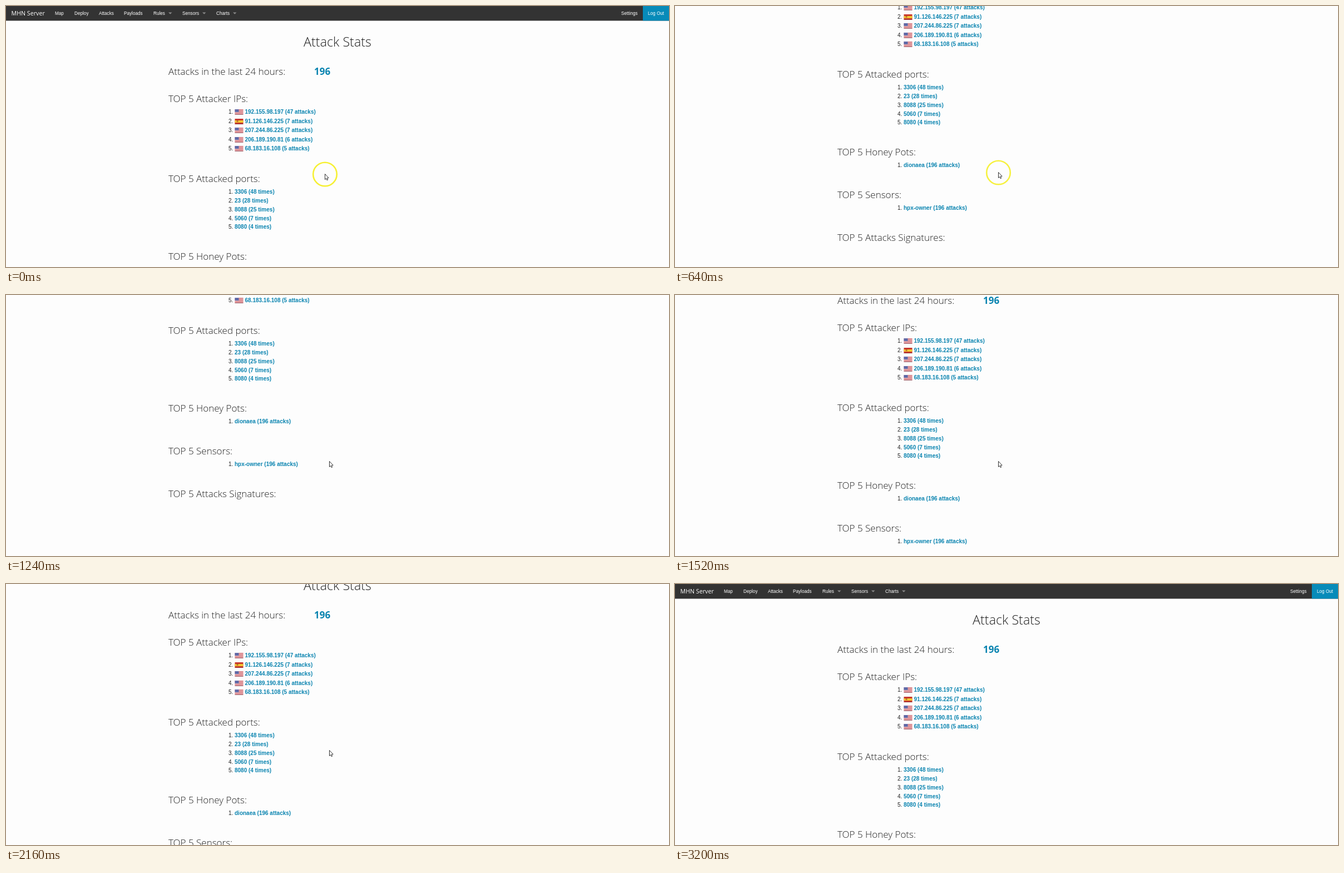
Recreate the animation shown at these times as an HTML page with a canvas. Size 1192x470 px, loop 4960 ms.

```html
<!DOCTYPE html>
<html lang="en">
<head>
<meta charset="utf-8">
<title>Attack Stats</title>
<style>
  html, body { margin: 0; height: 100%; overflow: hidden; background: #fdfdfd; }
  canvas { display: block; }
</style>
</head>
<body>
<canvas id="stage" width="1192" height="470"></canvas>
<script>
const ctx = document.getElementById('stage').getContext('2d');
const LOOP = 4960, INK = '#222', BLUE = '#0a84b0';
const LIGHT = '300 17px "Open Sans", sans-serif';
const LINK = 'bold 10px "Liberation Sans", Arial, sans-serif';
const PLAIN = '10px "Liberation Sans", Arial, sans-serif';
const NAV = '8.2px "Liberation Sans", Arial, sans-serif';

const attackers = [
  ['us', '192.155.98.197 (47 attacks)'],
  ['es', '91.126.146.225 (7 attacks)'],
  ['us', '207.244.86.225 (7 attacks)'],
  ['us', '206.189.190.81 (6 attacks)'],
  ['us', '68.183.16.108 (5 attacks)'],
];
const ports = ['3306 (48 times)', '23 (28 times)', '8088 (25 times)', '5060 (7 times)', '8080 (4 times)'];
const menu = [['Map', 88], ['Deploy', 123], ['Attacks', 167], ['Payloads', 212],
  ['Rules', 265, 292], ['Sensors', 317, 353], ['Charts', 378, 408]];

// Wheel ticks: start, duration, distance
const ticks = [[200, 160, 62.5], [350, 160, 62.5], [495, 140, 63], [700, 150, 59],
  [1270, 140, -62], [1370, 140, -62], [1470, 160, -61], [2260, 160, -62]];

const smooth = (t, start, length) => {
  const p = Math.min(1, Math.max(0, (t - start) / length));
  return p * p * (3 - 2 * p);
};

function text(str, x, y, font, color = INK) {
  ctx.font = font;
  ctx.fillStyle = color;
  ctx.fillText(str, x, y);
}

function rect(x, y, w, h, color) {
  ctx.fillStyle = color;
  ctx.fillRect(x, y, w, h);
}

function shape(points, fill, stroke) {
  ctx.beginPath();
  points.forEach(([x, y]) => ctx.lineTo(x, y));
  ctx.closePath();
  ctx.fillStyle = fill;
  ctx.fill();
  if (stroke) {
    ctx.strokeStyle = stroke;
    ctx.lineWidth = 1;
    ctx.stroke();
  }
}

function flag(kind, x, y) {
  if (kind === 'es') {
    rect(x, y, 15, 10, '#c8382c');
    rect(x, y + 3, 15, 4, '#f3c632');
    rect(x + 3, y + 3, 3, 3, '#b9742f');
  } else {
    rect(x, y, 15, 10, '#e9c3c6');
    for (let i = 0; i < 5; i++) rect(x, y + i * 2, 15, 1, '#d2686f');
    rect(x, y, 7, 5, '#5f6aa8');
  }
  rect(x, y + 9, 15, 1, 'rgba(90,50,60,.45)');
}

function item(n, label, y, country) {
  text(n + '.', 400, y, PLAIN);
  if (country) flag(country, 411.5, y - 8);
  text(label, country ? 429.5 : 411, y, LINK, BLUE);
}

function navBar() {
  rect(0, 0, 1192, 26.5, '#333');
  rect(1145, 0, 47, 26.5, '#078bb9');
  text('MHN Server', 9.5, 17, '10.7px "Open Sans", sans-serif', '#fff');
  for (const [label, x, caret] of menu) {
    text(label, x, 16, NAV, '#fff');
    if (caret) shape([[caret, 11.5], [caret + 6.5, 11.5], [caret + 3.25, 14.8]], '#8a8a8a');
  }
  text('Settings', 1106, 16, NAV, '#fff');
  text('Log Out', 1154, 16, NAV, '#fff');
}

function page() {
  navBar();
  ctx.textAlign = 'center';
  text('Attack Stats', 596, 72.5, '300 23.3px "Open Sans", sans-serif');
  ctx.textAlign = 'left';
  text('Attacks in the last 24 hours:', 292, 123.5, LIGHT);
  text('196', 554, 123.5, 'bold 17px "Open Sans", sans-serif', BLUE);
  text('TOP 5 Attacker IPs:', 292, 173, LIGHT);
  attackers.forEach(([country, label], i) => item(i + 1, label, Math.round(194 + i * 16.5), country));
  text('TOP 5 Attacked ports:', 292, 317, LIGHT);
  ports.forEach((label, i) => item(i + 1, label, Math.round(338.4 + i * 15.7), ''));
  text('TOP 5 Honey Pots:', 292, 457, LIGHT);
  item(1, 'dionaea (196 attacks)', 478, '');
  text('TOP 5 Sensors:', 292, 534, LIGHT);
  item(1, 'hpx-owner (196 attacks)', 555, '');
  text('TOP 5 Attacks Signatures:', 292, 611, LIGHT);
}

function pointer(t) {
  if (t >= 3000) return;
  const move = smooth(t, 40, 240);
  ctx.save();
  ctx.translate(573.5 + 8 * move, 303 - 3 * move);
  ctx.globalAlpha = 1 - smooth(t, 560, 520);
  ctx.strokeStyle = '#f6f032';
  ctx.lineWidth = 2.6;
  ctx.beginPath();
  ctx.arc(0, 0, 21.3, 0, Math.PI * 2);
  ctx.stroke();
  ctx.globalAlpha = 1;
  shape([[0, -.5], [0, 9.5], [2.2, 7.5], [3.7, 10.8], [5.2, 10], [3.8, 6.9], [6.6, 6.6]], '#fff', '#333');
  ctx.restore();
}

function draw(t) {
  const scroll = ticks.reduce((sum, [start, length, dy]) => sum + dy * smooth(t, start, length), 0);
  rect(0, 0, 1192, 470, '#fdfdfd');
  ctx.save();
  ctx.translate(0, -Math.round(scroll));
  page();
  ctx.restore();
  pointer(t);
}

function tick() {
  draw(performance.now() % LOOP);
  requestAnimationFrame(tick);
}
tick();
</script>
</body>
</html>
```
